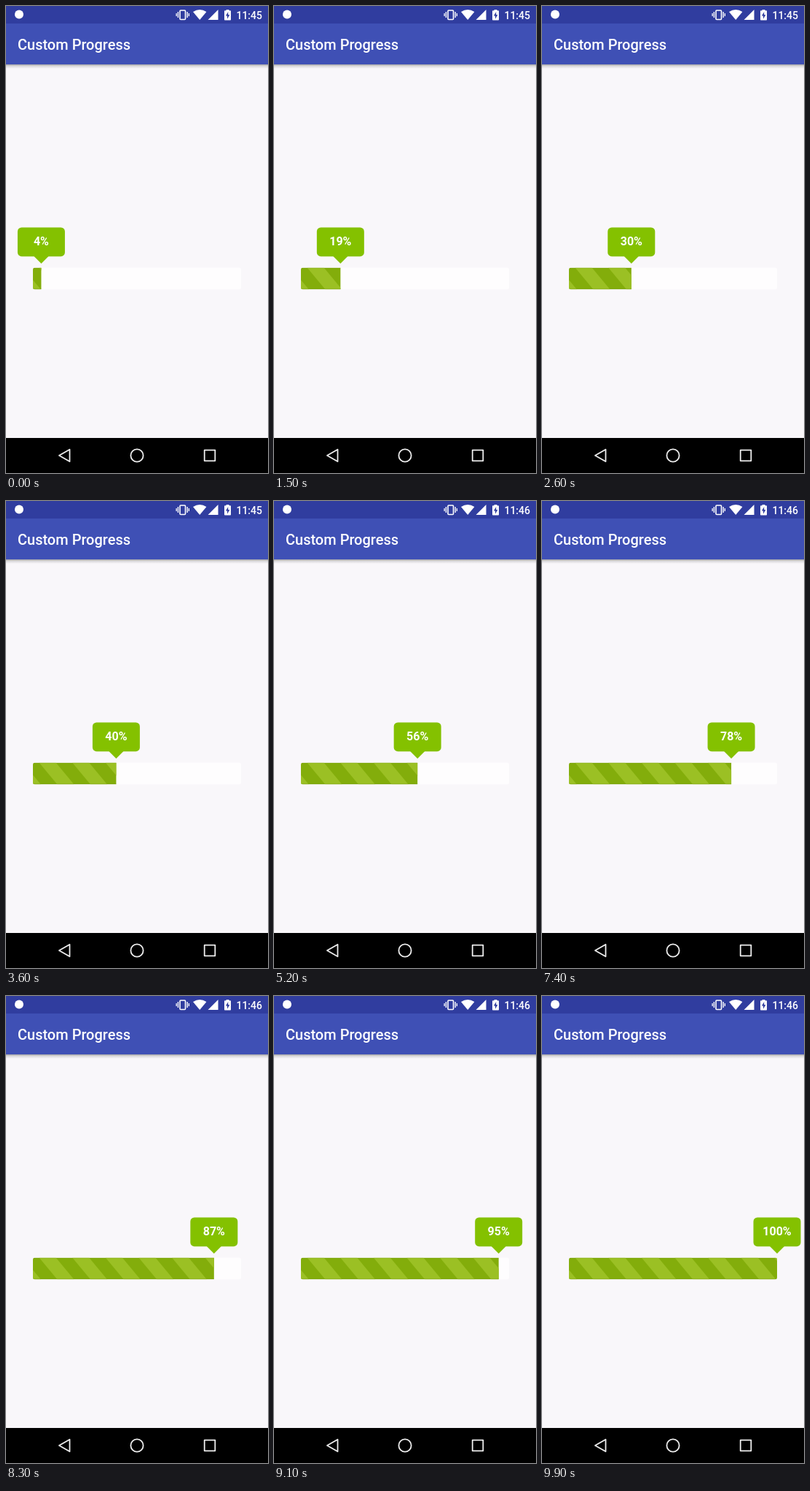
Write an HTML page with a canvas that moves like this. It is 360 px wide and 640 px high and loops after 10000 ms.

```html
<!DOCTYPE html>
<html lang="en">
<head>
<meta charset="utf-8">
<title>Custom Progress</title>
<style>
  html, body { margin: 0; width: 100%; height: 100%; overflow: hidden; background: #f9f7fa; }
  canvas, svg { position: absolute; left: 0; top: 0; width: 360px; height: 640px; }
  text { font-family: Roboto, "Noto Sans", sans-serif; font-weight: 500; fill: #fff; }
</style>
</head>
<body>
<canvas id="stage"></canvas>
<svg viewBox="0 0 360 640">
  <text x="16" y="59.5" font-size="20">Custom Progress</text>
  <text id="clock" x="352" y="17.5" font-size="14" text-anchor="end">11:45</text>
  <text id="label" y="327.5" font-size="16" text-anchor="middle" style="font-weight:700">4%</text>
</svg>
<script>
const LOOP = 10000, STEP = 100, MINUTE_AT = 4500;
const BAR = { x: 37, y: 358.5, w: 286, h: 30, r: 3 };
const STRIPE = { first: 45.5, period: 45.6, width: 23, lean: 25 };

const canvas = document.getElementById('stage');
const clock = document.getElementById('clock');
const label = document.getElementById('label');
const ctx = canvas.getContext('2d');
const dpr = window.devicePixelRatio || 1;
canvas.width = 360 * dpr;
canvas.height = 640 * dpr;
ctx.scale(dpr, dpr);

function rect(x, y, w, h, color) {
  ctx.fillStyle = color;
  ctx.fillRect(x, y, w, h);
}

function poly(points, color) {
  ctx.beginPath();
  points.forEach(([x, y]) => ctx.lineTo(x, y));
  ctx.closePath();
  ctx.fillStyle = color;
  ctx.fill();
}

function roundPath(x, y, w, h, r) {
  ctx.beginPath();
  ctx.moveTo(x + r, y);
  ctx.arcTo(x + w, y, x + w, y + h, r);
  ctx.arcTo(x + w, y + h, x, y + h, r);
  ctx.arcTo(x, y + h, x, y, r);
  ctx.arcTo(x, y, x + w, y, r);
  ctx.closePath();
}

function drawStatusIcons() {
  const white = '#fff';
  ctx.fillStyle = white;
  ctx.beginPath();
  ctx.arc(18, 11.5, 6, 0, Math.PI * 2);
  ctx.fill();

  // vibrate
  ctx.strokeStyle = white;
  ctx.lineWidth = 1.6;
  roundPath(239, 6, 7.5, 12.5, 1);
  ctx.stroke();
  rect(235.7, 8, 1.4, 8, white);
  rect(233.5, 10, 1.3, 4, white);
  rect(248.4, 8, 1.4, 8, white);
  rect(250.7, 10, 1.3, 4, white);

  // wifi
  ctx.beginPath();
  ctx.moveTo(266.2, 19);
  ctx.lineTo(257, 8);
  ctx.quadraticCurveTo(266.2, 2, 275.4, 8);
  ctx.closePath();
  ctx.fillStyle = white;
  ctx.fill();

  // signal
  poly([[277.5, 19], [291.5, 19], [291.5, 5]], white);

  // battery
  rect(302.6, 5, 3.8, 2, white);
  roundPath(300, 6.3, 9, 13.2, 0.8);
  ctx.fillStyle = white;
  ctx.fill();
  poly([[305.2, 8], [301.9, 13.6], [304, 13.6], [304, 17.8], [307.3, 12], [305.2, 12]], '#303d9f');
}

function drawHeader() {
  const shade = ctx.createLinearGradient(0, 80, 0, 86);
  shade.addColorStop(0, 'rgba(0,0,0,.34)');
  shade.addColorStop(0.4, 'rgba(0,0,0,.12)');
  shade.addColorStop(1, 'rgba(0,0,0,0)');
  rect(0, 80, 360, 6, shade);
  rect(0, 24, 360, 56, '#3f50b5');
  rect(0, 0, 360, 24, '#303d9f');
  drawStatusIcons();
}

function drawNav() {
  rect(0, 592, 360, 48, '#000');
  ctx.strokeStyle = '#eee';
  ctx.lineWidth = 1.8;
  ctx.lineJoin = 'round';
  ctx.beginPath();
  ctx.moveTo(73, 616);
  ctx.lineTo(87.5, 607.7);
  ctx.lineTo(87.5, 624.3);
  ctx.closePath();
  ctx.stroke();
  ctx.beginPath();
  ctx.arc(180, 616, 8.6, 0, Math.PI * 2);
  ctx.stroke();
  ctx.strokeRect(272.7, 608.7, 14.6, 14.6);
}

function drawBar(edge) {
  const { x, y, w, h, r } = BAR;
  ctx.save();
  roundPath(x, y, w, h, r);
  ctx.clip();
  rect(x, y, w, h, '#fefdfe');
  ctx.beginPath();
  ctx.rect(x, y, edge - x, h);
  ctx.clip();
  rect(x, y, w, h, '#83ad0b');
  for (let s = STRIPE.first - STRIPE.period; s < x + w; s += STRIPE.period) {
    const { width, lean } = STRIPE;
    poly([[s, y], [s + width, y], [s + width + lean, y + h], [s + lean, y + h]], '#9bc024');
  }
  rect(x, y, w, 0.8, 'rgba(90,130,0,.35)');
  rect(x, y + h - 1, w, 1, 'rgba(90,130,0,.4)');
  ctx.restore();
}

function drawBubble(x) {
  const green = '#84c100';
  roundPath(x - 32.5, 303.5, 65, 39.7, 5.5);
  ctx.fillStyle = green;
  ctx.fill();
  poly([[x - 10.5, 342.5], [x + 10.5, 342.5], [x, 353]], green);
}

function draw(t) {
  const percent = Math.min(100, 4 + Math.floor(t / STEP));
  const edge = BAR.x + BAR.w * percent / 100;
  rect(0, 0, 360, 640, '#f9f7fa');
  drawHeader();
  drawBar(edge);
  drawBubble(edge);
  drawNav();
  label.textContent = percent + '%';
  label.setAttribute('x', edge);
  clock.textContent = t < MINUTE_AT ? '11:45' : '11:46';
}

const start = performance.now();
function tick() {
  draw((performance.now() - start) % LOOP);
  requestAnimationFrame(tick);
}
tick();
</script>
</body>
</html>
```
